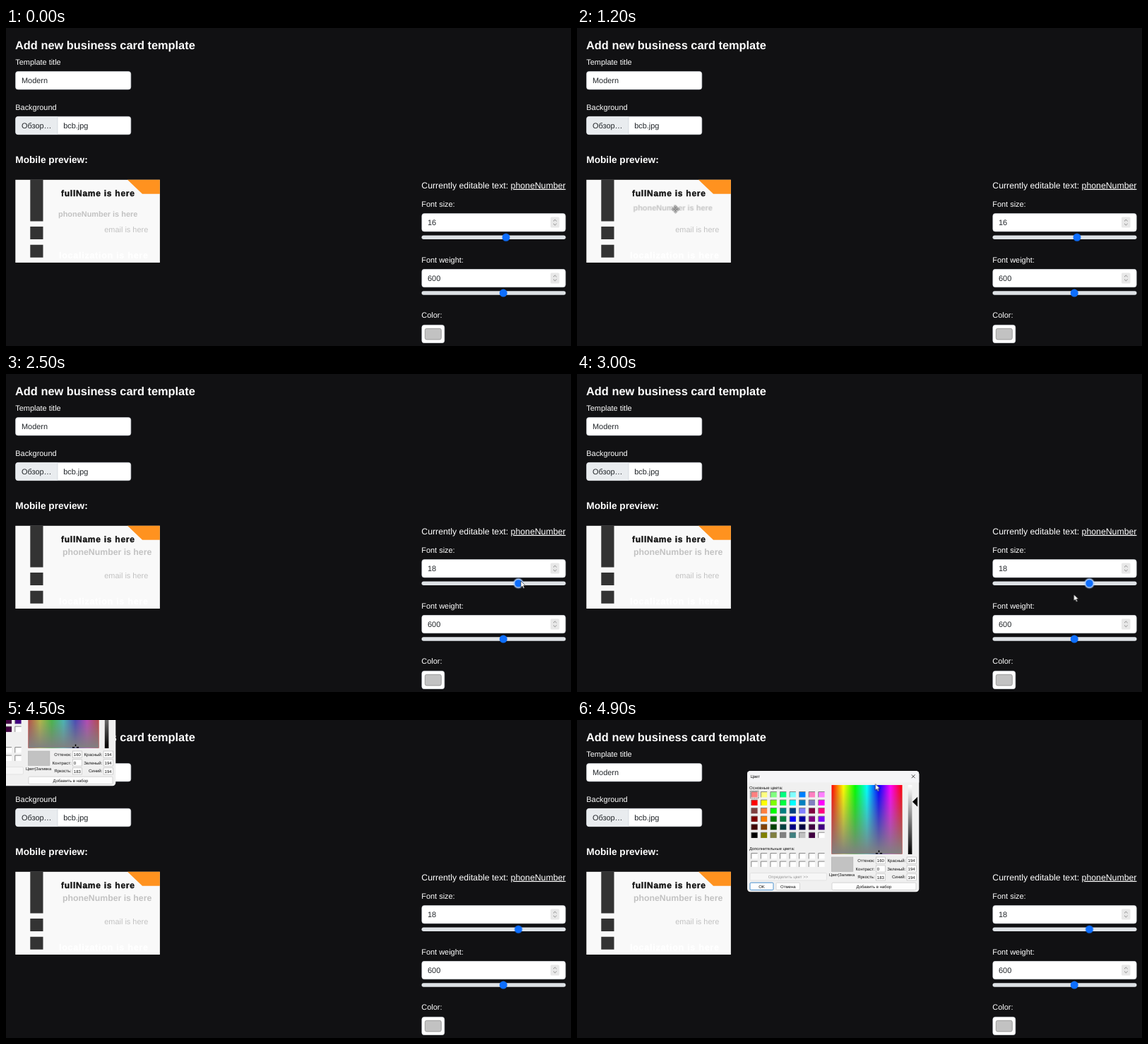
Recreate the animation shown at these times as an HTML page. Size 800 by 450 pixels, loop 5000 ms.

```html
<!DOCTYPE html>
<html lang="en">
<head>
<meta charset="utf-8">
<title>Business card template editor</title>
<style>
html, body { margin: 0; width: 100%; height: 100%; overflow: hidden; background: #111113; }
svg { display: block; width: 100vw; height: 100vh; }
text { font-family: "Liberation Sans", Arial, sans-serif; font-size: 10.93px; text-rendering: geometricPrecision; }
.w { fill: #fff; }
.ink { fill: #212529; }
.b { font-weight: 700; }
.box { fill: #fff; stroke: #ced4da; stroke-width: .6; }
.track { fill: #dee2e6; }
.thumb { fill: #0d6efd; }
.btn { fill: #fdfdfd; stroke: #c8c8c8; stroke-width: .7; }
.field { fill: #fff; stroke: #b4b4b4; stroke-width: .6; }
#dialog text { font-size: 6px; fill: #111; }

#phone, #phone text, #size, #ring, .v, #ptr, #arrow, #move, #dialog { animation: 5s infinite step-end; }

#phone { animation-name: drag; }
#phone text { animation-name: grow; }
@keyframes drag {
  0% { transform: translate(74px, 267.3px); }
  14% { transform: translate(74px, 267.3px); animation-timing-function: steps(5); }
  24% { transform: translate(79.5px, 258.5px); animation-timing-function: steps(2); }
  28%, 100% { transform: translate(80px, 256.2px); }
}
@keyframes grow {
  0% { font-size: 10.93px; }
  44% { font-size: 11.61px; }
  48%, 100% { font-size: 12.29px; }
}

#size { animation-name: slide; }
@keyframes slide {
  0% { transform: translate(708px, 296.2px); }
  44% { transform: translate(716.7px, 296.2px); }
  48%, 100% { transform: translate(725.5px, 296.2px); }
}
#ring { animation-name: focus; }
@keyframes focus { 0% { opacity: 0; } 40% { opacity: 1; } 70%, 100% { opacity: 0; } }

#v16 { animation-name: v16; }
#v17 { animation-name: v17; }
#v18 { animation-name: v18; }
@keyframes v16 { 0% { opacity: 1; } 44%, 100% { opacity: 0; } }
@keyframes v17 { 0% { opacity: 0; } 44% { opacity: 1; } 48%, 100% { opacity: 0; } }
@keyframes v18 { 0% { opacity: 0; } 48%, 100% { opacity: 1; } }

#ptr { animation-name: path; }
@keyframes path {
  0% { transform: translate(300px, 462px); animation-timing-function: steps(5); }
  10% { transform: translate(133.5px, 265px); }
  14% { transform: translate(133.5px, 265px); animation-timing-function: steps(5); }
  24% { transform: translate(139.5px, 256.5px); animation-timing-function: steps(2); }
  28% { transform: translate(140px, 254px); }
  30% { transform: translate(140px, 254px); animation-timing-function: steps(4); }
  38% { transform: translate(711.5px, 291.5px); }
  40% { transform: translate(711.5px, 291.5px); animation-timing-function: steps(5); }
  50% { transform: translate(729px, 293px); }
  54% { transform: translate(729px, 293px); animation-timing-function: steps(3); }
  60% { transform: translate(703.5px, 312px); animation-timing-function: steps(4); }
  68% { transform: translate(605px, 432px); }
  74% { transform: translate(605px, 432px); animation-timing-function: steps(2); }
  78% { transform: translate(569.5px, 328px); animation-timing-function: steps(5); }
  88% { transform: translate(95px, -70px); }
  90% { transform: translate(95px, -70px); animation-timing-function: steps(3); }
  96% { transform: translate(424px, 80px); }
  98%, 100% { transform: translate(422.5px, 90.5px); }
}
#arrow { animation-name: arrow; }
#move { animation-name: move; }
@keyframes arrow { 0% { opacity: 1; } 10% { opacity: 0; } 30%, 100% { opacity: 1; } }
@keyframes move { 0% { opacity: 0; } 10% { opacity: 1; } 30%, 100% { opacity: 0; } }

#dialog { transform-origin: 362.5px 157.5px; animation-name: open; }
@keyframes open {
  0% { opacity: 0; transform: translate(-329px, -150px) scale(.845); }
  76% { opacity: .1; transform: translate(-329px, -150px) scale(.845); animation-timing-function: steps(2); }
  80% { opacity: 1; transform: translate(-329px, -150px) scale(1); }
  90% { opacity: 1; transform: translate(-329px, -150px) scale(1); animation-timing-function: steps(3); }
  96%, 100% { opacity: 1; transform: translate(0px, 0px) scale(1); }
}
</style>
</head>
<body>
<svg viewBox="0 0 800 450" preserveAspectRatio="none">
  <defs>
    <linearGradient id="hue">
      <stop offset="0" stop-color="#f00"/><stop offset=".167" stop-color="#ff0"/>
      <stop offset=".333" stop-color="#0f0"/><stop offset=".5" stop-color="#0ff"/>
      <stop offset=".667" stop-color="#00f"/><stop offset=".833" stop-color="#f0f"/>
      <stop offset="1" stop-color="#f00"/>
    </linearGradient>
    <linearGradient id="fade" x2="0" y2="1">
      <stop offset="0" stop-color="#808080" stop-opacity="0"/><stop offset="1" stop-color="#808080"/>
    </linearGradient>
    <linearGradient id="lum" x2="0" y2="1">
      <stop offset="0" stop-color="#fff"/><stop offset="1" stop-color="#000"/>
    </linearGradient>
    <g id="spin">
      <rect width="12.5" height="15" rx="1.5" fill="#e8e8e8"/>
      <path d="M4 5.8 6.3 3.6 8.6 5.8M4 9.2 6.3 11.4 8.6 9.2" fill="none" stroke="#808080" stroke-width=".9"/>
    </g>
  </defs>
  <rect width="800" height="450" fill="#111113"/>

  <g class="w">
    <text class="b" x="13" y="30.2" style="font-size:16.39px">Add new business card template</text>
    <text x="13.3" y="52">Template title</text>
    <text x="13.3" y="115.7">Background</text>
    <text class="b" x="13.3" y="191" style="font-size:13.66px">Mobile preview:</text>
  </g>
  <rect class="box" x="13.5" y="61.5" width="163.3" height="25.4" rx="3.5"/>
  <text class="ink" x="22" y="78.2">Modern</text>
  <rect class="box" x="13.5" y="125.3" width="163.3" height="25.4" rx="3.5"/>
  <path d="M73 125.6H17a3.2 3.2 0 0 0-3.2 3.2v18.4a3.2 3.2 0 0 0 3.2 3.2H73z" fill="#e9ecef"/>
  <path d="M73 125.6v24.8" stroke="#ced4da" stroke-width=".7"/>
  <text class="ink" x="22" y="142">Обзор…</text>
  <text class="ink" x="81.2" y="142">bcb.jpg</text>

  <rect x="13.3" y="214.8" width="204.6" height="117.2" fill="#f9f9f9"/>
  <path d="M34.3 214.8h18.2v58.6H34.3zM34.3 281h18.2v18H34.3zM34.3 306.8h18.2v18H34.3z" fill="#333"/>
  <path d="M172 214.8h45.9v20H193z" fill="#ff921f"/>
  <text class="b" x="78" y="238.4" fill="#111" stroke="#111" stroke-width=".4" style="font-size:12px;letter-spacing:.75px">fullName is here</text>
  <text x="139.3" y="289" fill="#c2c2c2">email is here</text>
  <text class="b" x="75" y="325.8" fill="#fff" stroke="#fff" stroke-width=".4" style="font-size:12.6px;letter-spacing:.7px">localization is here</text>
  <g id="phone"><text class="b" fill="#c2c2c2">phoneNumber is here</text></g>

  <g class="w">
    <text x="588.3" y="226.8" style="font-size:12.29px">Currently editable text: <tspan text-decoration="underline">phoneNumber</tspan></text>
    <text x="588.3" y="252.8">Font size:</text>
    <text x="588.3" y="331.6">Font weight:</text>
    <text x="588.3" y="410.3">Color:</text>
  </g>
  <rect class="box" x="588.8" y="262.5" width="203.4" height="25.4" rx="3.5"/>
  <text id="v16" class="ink v" x="597" y="279.2">16</text>
  <text id="v17" class="ink v" x="597" y="279.2">17</text>
  <text id="v18" class="ink v" x="597" y="279.2">18</text>
  <use href="#spin" x="771" y="267.6"/>
  <rect class="track" x="588.5" y="293.4" width="204" height="5.5" rx="2.75"/>
  <g id="size">
    <g id="ring"><circle r="7.4" fill="#86b7fe" opacity=".6"/><circle r="6.2" fill="#fff"/></g>
    <circle class="thumb" r="5.5"/>
  </g>
  <rect class="box" x="588.8" y="341.3" width="203.4" height="25.4" rx="3.5"/>
  <text class="ink" x="597" y="358">600</text>
  <use href="#spin" x="771" y="346.4"/>
  <rect class="track" x="588.5" y="372.3" width="204" height="5.5" rx="2.75"/>
  <circle class="thumb" cx="704.2" cy="375.1" r="5.5"/>
  <rect class="box" x="588.8" y="420.3" width="32" height="25.4" rx="3.5"/>
  <rect x="593.3" y="425.3" width="23" height="15.6" rx="2.4" fill="#c2c2c2" stroke="#8b8b8b" stroke-width=".8"/>

  <g id="dialog">
    <rect x="241" y="72" width="243.3" height="171.3" rx="4.5" fill="#f0f0f0"/>
    <path d="M241 88.5V76.5a4.5 4.5 0 0 1 4.5-4.5h234.3a4.5 4.5 0 0 1 4.5 4.5v12z" fill="#f5f5f7"/>
    <text x="245.5" y="82.2">Цвет</text>
    <path d="m473.8 77.4 4.8 4.8m0-4.8-4.8 4.8" stroke="#222" stroke-width=".8"/>
    <text x="244" y="97.6">Основные цвета:</text>
    <g id="cells"></g>
    <text x="244" y="183.6" style="font-size:5.8px">Дополнительные цвета:</text>
    <rect x="245" y="216.5" width="108.5" height="10.4" rx="1.5" fill="#f6f6f6" stroke="#dcdcdc" stroke-width=".7"/>
    <text x="299" y="224" text-anchor="middle" style="fill:#999">Определить цвет &gt;&gt;</text>
    <rect class="btn" x="245" y="230.2" width="33" height="10.4" rx="1.5" style="stroke:#0067c0"/>
    <text x="261.5" y="237.6" text-anchor="middle">OK</text>
    <rect class="btn" x="282" y="230.2" width="33.5" height="10.4" rx="1.5"/>
    <text x="298.8" y="237.6" text-anchor="middle">Отмена</text>
    <rect class="btn" x="361" y="230.2" width="119" height="10.4" rx="1.5"/>
    <text x="420.5" y="237.6" text-anchor="middle">Добавить в набор</text>
    <rect x="360.5" y="92" width="100" height="97.6" fill="url(#hue)"/>
    <rect x="360.5" y="92" width="100" height="97.6" fill="url(#fade)"/>
    <path d="M427.5 184.5v2.6m-4.6 1.6h3.2m2.8 0h3.2" stroke="#000" stroke-width="1.5"/>
    <rect x="468.8" y="92" width="5.6" height="98" fill="url(#lum)"/>
    <path d="m475 115.7 7.2-7v14z" fill="#000"/>
    <rect x="360.3" y="194" width="30.6" height="20.4" fill="#c2c2c2" stroke="#aaa" stroke-width=".5"/>
    <text x="357" y="221.3" style="font-size:5.7px">Цвет|Заливка</text>
    <g id="fields"></g>
  </g>

  <g id="ptr">
    <path id="arrow" d="M0 0v9l2.1-1.9 1.5 3.3 1.6-.7-1.5-3.2h2.9z" fill="#fff" stroke="#111" stroke-width=".6"/>
    <g id="move" fill="#fff" stroke="#555" stroke-width=".8">
      <path d="M0-5.6 2.2-3H-2.2zM0 5.6 2.2 3H-2.2zM-5.6 0-3-2.2V2.2zM5.6 0 3-2.2V2.2z"/>
      <path d="M-2.8 0h5.6M0-2.8v5.6" stroke-width="1.2"/>
      <circle r="1.3"/>
    </g>
  </g>
</svg>
<script>
const put = (id, html) => document.getElementById(id).innerHTML = html;

const palette = `
  ff8080 ffff80 80ff80 00ff80 80ffff 0080ff ff80c0 ff80ff
  ff0000 ffff00 80ff00 00ff40 00ffff 0080c0 8080c0 ff00ff
  804040 ff8040 00ff00 008080 004080 8080ff 800040 ff0080
  800000 ff8000 008000 008040 0000ff 0000a0 800080 8000ff
  400000 804000 004000 004040 000080 000040 400040 400080
  000000 808000 808040 808080 408080 c0c0c0 400040 ffffff`.trim().split(/\s+/);

const cell = (i, top, color) => {
  const x = 246.8 + i % 8 * 13.57, y = top + Math.floor(i / 8) * 11.5;
  return `<rect x="${x}" y="${y}" width="8.8" height="7.8" fill="${color}"/>` +
    `<path d="M${x} ${y + 7.8}v-7.8h8.8" fill="none" stroke="#777" stroke-width=".9"/>`;
};
put('cells',
  palette.map((c, i) => cell(i, 101.6, '#' + c)).join('') +
  Array.from({ length: 16 }, (_, i) => cell(i, 188.6, '#fff')).join('') +
  '<rect x="245.4" y="100.2" width="11.6" height="10.6" fill="none" stroke="#222" stroke-width=".7" stroke-dasharray="1 .7"/>');

const field = (label, value, right, row) => {
  const y = 194 + row * 11.9;
  return `<text x="${right}" y="${y + 6.6}" text-anchor="end">${label}:</text>` +
    `<rect class="field" x="${right + 1.7}" y="${y}" width="13.4" height="9.2"/>` +
    `<text x="${right + 3.2}" y="${y + 6.7}">${value}</text>`;
};
put('fields',
  [['Оттенок', 160], ['Контраст', 0], ['Яркость', 183]].map(([l, v], i) => field(l, v, 421.6, i)).join('') +
  ['Красный', 'Зеленый', 'Синий'].map((l, i) => field(l, 194, 465.4, i)).join(''));
</script>
</body>
</html>
```
